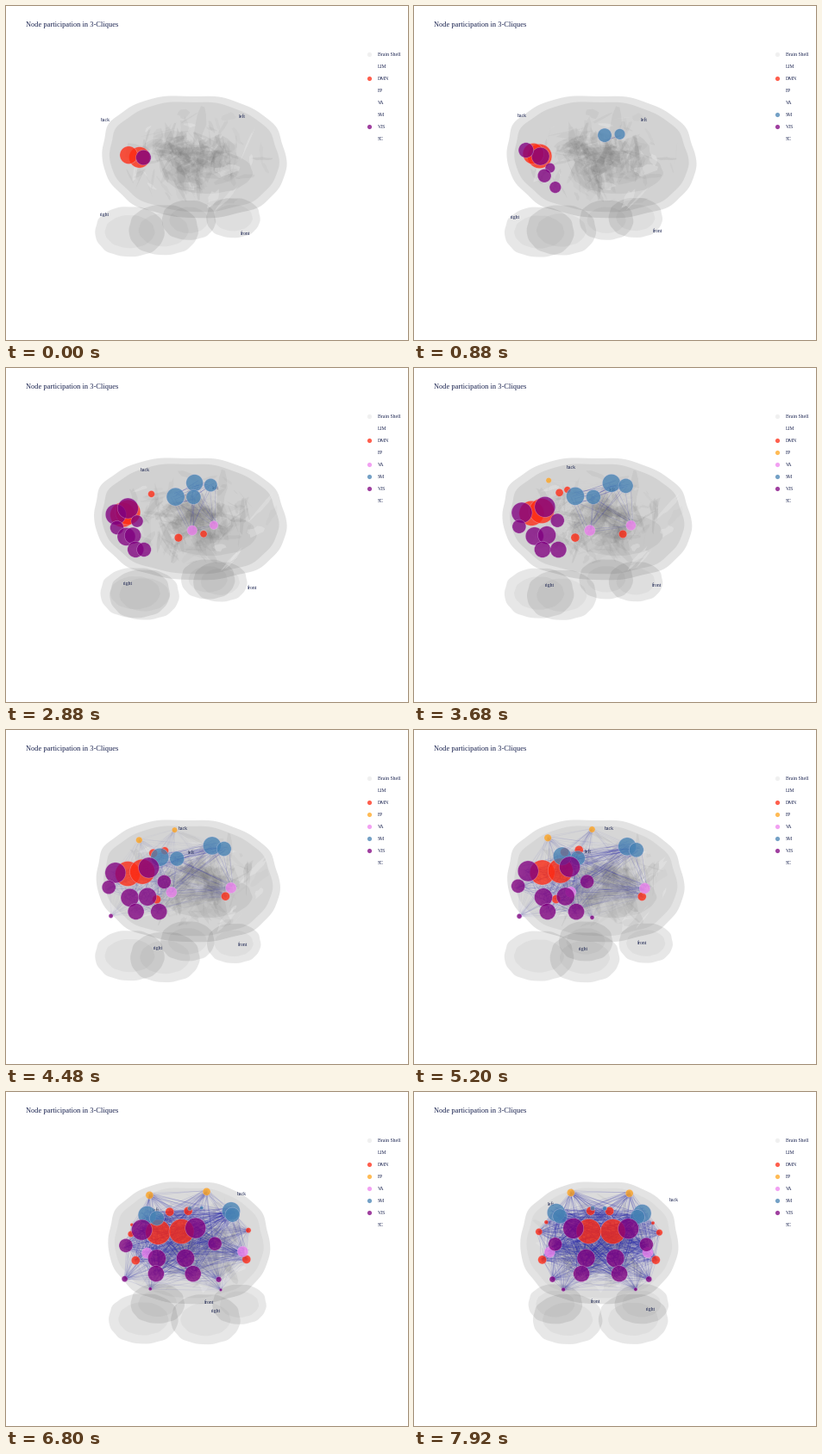
Animation of 466 by 388 pixels, one loop 8000 ms. Source, as a matplotlib script:

```python
import numpy as np
import matplotlib.pyplot as plt
from matplotlib.animation import FuncAnimation
from matplotlib.collections import LineCollection, PolyCollection
from matplotlib.colors import to_rgba
from matplotlib.patches import Polygon

W, H, DPI, FRAMES = 466, 388, 100, 100
CX, HORIZON = 214.5, 209
PX = 72 / DPI
INK = "#1a2350"
rng = np.random.default_rng(4)

fig = plt.figure(figsize=(W / DPI, H / DPI), dpi=DPI, facecolor="white")
ax = fig.add_axes([0, 0, 1, 1])
ax.set(xlim=(0, W), ylim=(H, 0))
ax.axis("off")

# Space: across (right positive), back (towards the final viewer), screen height
COLORS = {"DMN": "#ff2a12", "FP": "#ffa51e", "VA": "#ee82ee", "SM": "#4682b4", "VIS": "#800080"}

# Sites, mirrored in both hemispheres: across, y, back, full radius, first frame
SITES = {
    "DMN": [(14, 165, 77, 14.5, -12), (11, 141, 44, 5, 29), (70, 163, 5, 4, 68),
            (62, 153, 26, 2.5, 79), (66, 195, 0, 5, 15)],
    "FP": [(34, 121, 47, 4.5, 45)],
    "VA": [(57, 186, -14, 6.3, 17)],
    "SM": [(50, 141, 7, 10.5, 5), (45, 144, -13, 8.5, 8), (7, 134, -17, 2.7, 66)],
    "VIS": [(32, 162, 81, 12, -3), (53, 179, 75, 8, 10), (17, 194, 72, 10.5, 7),
            (22, 211, 60, 9.5, 10), (56, 217, 70, 3.5, 54), (42, 229, 20, 2.3, 70)]}
RIGHT_DELAY = 11

LABELS = {"back": (84, 66, -66), "left": (-55, -36, -90),
          "front": (-2, -72, 49), "right": (58, 82, 33)}

kinds, rows = [], []
for kind, sites in SITES.items():
    for across, y, back, radius, born in sites:
        for side in (-1, 1):
            kinds.append(kind)
            rows.append((side * across, y, back - .08 * side * across, radius,
                         born + RIGHT_DELAY * (side > 0)))
kinds = np.array(kinds)
node_across, node_y, node_back, full_radius, born = np.array(rows, float).T
node_colors = np.array([to_rgba(COLORS[kind], .78) for kind in kinds])

# Links: loose bundles of strands; motor links come first, the rest fade in late
ia, ib = np.triu_indices(len(kinds), 1)
ia, ib = np.repeat(ia, 2), np.repeat(ib, 2)
slack = rng.normal(0, .35, (len(ia), 2, 2))
motor = np.isin(kinds, ["SM", "VA"])
early = motor[ia] & motor[ib]

# Folds: thin flat patches scattered through the brain volume
N_FOLDS, CORNERS = 230, 11
way = rng.normal(size=(N_FOLDS, 3))
way /= np.linalg.norm(way, axis=1)[:, None]
reach = rng.uniform(.2, .88, N_FOLDS)
middle = way * reach[:, None] * [82, 102, 64] + [0, -6, 0]
along = rng.normal(size=(N_FOLDS, 3))
along /= np.linalg.norm(along, axis=1)[:, None]
sideways = np.cross(along, way)
turn = np.linspace(0, 2 * np.pi, CORNERS, endpoint=False)[None, :, None]
spread = rng.uniform(.6, 1.3, (N_FOLDS, CORNERS, 1)) * rng.uniform(6, 21, (N_FOLDS, 1, 1))
folds = middle[:, None] + spread * (np.cos(turn) * along[:, None]
                                    + .45 * np.sin(turn) * sideways[:, None])
fold_colors = np.full((N_FOLDS, 4), .36)
fold_colors[:, 3] = rng.uniform(.025, .09, N_FOLDS)
fold_colors[(reach > .75) & (rng.random(N_FOLDS) < .35)] = (.95, .95, .95, .3)


def view(frame):
    angle = np.radians(121 - frame - .0024 * frame ** 2)
    return np.cos(angle), np.sin(angle)


def project(across, back, c, s):
    """Screen x and nearness of a point turned about the vertical axis."""
    return CX + across * c - back * s, across * s + back * c


def lobe_outline(x, y, rx, ry, power=2.0, lean=0.0):
    a = np.linspace(0, 2 * np.pi, 160, endpoint=False)
    ca, sa = np.cos(a), np.sin(a)
    bump = 1 + .008 * np.sin(9 * a) + .006 * np.sin(14 * a + 1)
    dx = rx * bump * np.sign(ca) * np.abs(ca) ** (2 / power)
    dy = ry * bump * np.sign(sa) * np.abs(sa) ** (2 / power)
    return np.c_[x + dx + lean * dy, y + dy]


def blank_lobe(alpha):
    return ax.add_patch(Polygon([(0, 0), (1, 0), (0, 1)], fc=(.35, .35, .35), alpha=alpha,
                                ec="none", zorder=1))


cerebrum, cortex, core = blank_lobe(.17), blank_lobe(.1), blank_lobe(.09)
lower_lobes = [blank_lobe(.14) for _ in range(4)]
lower_cores = [blank_lobe(.06) for _ in range(4)]
fold_art = ax.add_collection(PolyCollection([], facecolors=fold_colors, edgecolors="none", zorder=3))
link_art = ax.add_collection(LineCollection([], linewidths=.45, zorder=4))
dots = ax.scatter([], [], edgecolors=(.9, .85, .95, .45), linewidths=.4, zorder=6)


def write(x, y, text, px, **kw):
    return ax.text(x, y, text, family="Liberation Serif", fontsize=px * PX, color=INK,
                   va="center_baseline", **kw)


def legend_dot(y, color, alpha=1):
    return ax.scatter([421], [y], s=(5.2 * PX) ** 2, c=color, alpha=alpha, linewidths=0)


labels = {name: write(0, 0, name, 5.8, ha="center", zorder=5) for name in LABELS}
write(23, 21.5, "Node participation in 3-Cliques", 8.35)
keys = {}
for i, name in enumerate(["Brain Shell", "LIM", "DMN", "FP", "VA", "SM", "VIS", "SC"]):
    y = 56 + 14 * i
    write(431, y, name, 5.8)
    if name in COLORS:
        keys[name] = legend_dot(y, COLORS[name], .75)
legend_dot(56, "#f0f0f0")


def draw_brain(c, s):
    x, y = CX - 8 * s * c, 175
    rx = np.hypot(91 * c, 111 * s)
    lean = .1 * s
    cerebrum.set_xy(lobe_outline(x, y, rx, 71, 2.3, lean))
    cortex.set_xy(lobe_outline(x, y, rx * .92, 64, 2.2, lean))
    cortex.set_alpha(.05 + .08 * s ** 2)
    core.set_xy(lobe_outline(CX + 22 * s, 193, 42 + 12 * s, 25))

    # Cerebellum halves, then temporal lobes
    places = [(side * across, back, y, rx, ry)
              for across, back, y, rx, ry in [(38, 60, 262, 40, 29), (50, -27, 247, 31, 23)]
              for side in (-1, 1)]
    for lobe, inside, (across, back, y, rx, ry) in zip(lower_lobes, lower_cores, places):
        x, near = project(across, back, c, s)
        y += .03 * near
        lobe.set_xy(lobe_outline(x, y, rx, ry, 2.2))
        inside.set_xy(lobe_outline(x, y, rx * .72, ry * .66))

    x, near = project(folds[..., 0], folds[..., 1], c, s)
    y = 178 - folds[..., 2] * (1 + .0016 * near)
    fold_art.set_verts(np.stack([x, y], -1))
    fold_art.set_clip_path(cerebrum)


def draw_network(frame, c, s):
    x, _ = project(node_across, node_back, c, s)
    height = HORIZON - node_y
    y = node_y + height * ((.07 - .11 * c) * node_back / 45 - .0023 * node_across * s)
    places = np.c_[x, y]
    age = frame - born
    seen = age >= 0
    radius = full_radius * (.7 + .3 * np.clip(age / 25, 0, 1))
    dots.set_offsets(places[seen])
    dots.set_sizes((2 * radius[seen] * PX) ** 2)
    dots.set_facecolors(node_colors[seen])

    on = seen[ia] & seen[ib]
    a, b = ia[on], ib[on]
    size = np.stack([radius[a], radius[b]], 1)
    tint = np.tile(to_rgba("#2c2cab"), (len(a), 1))
    late = np.clip((frame - 45) / 50, 0, 1)
    tint[:, 3] = .42 * np.clip(size.min(1) / 10, .15, 1) * np.where(early[on], .8, late)
    link_art.set_segments(np.stack([places[a], places[b]], 1) + slack[on] * size[..., None])
    link_art.set_color(tint)


def update(frame):
    c, s = view(frame)
    draw_brain(c, s)
    draw_network(frame, c, s)
    for name, (across, back, drop) in LABELS.items():
        x, near = project(across, back, c, s)
        labels[name].set_position((x, 208 + drop * (1 + .004 * near)))
    for name, key in keys.items():
        key.set_visible(frame >= born[kinds == name].min())
    return []


anim = FuncAnimation(fig, update, frames=FRAMES, interval=80, repeat=True, repeat_delay=0,
                     init_func=lambda: update(0), blit=False)
plt.show()
```
